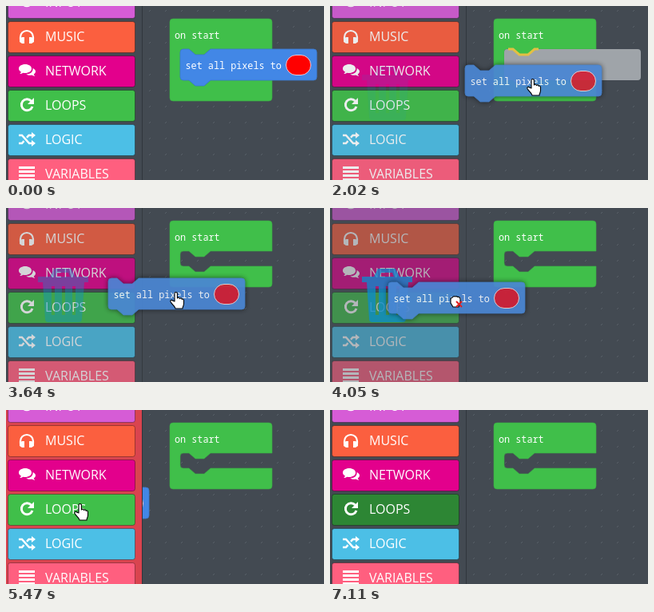
An HTML page that plays this animation: 398x218 px, repeating every 7510 ms.

```html
<!DOCTYPE html>
<html lang="en">
<head>
<meta charset="utf-8">
<title>Dragging a block to the toolbox</title>
<style>
html, body { margin: 0; height: 100%; overflow: hidden; background: #434a52; }
svg { display: block; width: 100vw; height: 100vh; }
text { fill: #fff; white-space: pre; }
.label { font: 16px "Open Sans", sans-serif; }
.code { font: 500 11.8px "Noto Sans Mono", monospace; }
.icon { fill: none; stroke: #fff; }
.dragged { opacity: .92; filter: drop-shadow(0 0 3px #0009); }
.dragged path { fill: #4a86d4; stroke: #4580cc; }
.dragged rect { fill: #d22038; stroke: #e6d5dc; }
.hand { fill: #fff; stroke: #000; stroke-width: 1.1; stroke-linejoin: round; }
</style>
</head>
<body>
<svg viewBox="0 0 398 218">
  <defs>
    <pattern id="dots" x="179" y="5" width="20" height="20" patternUnits="userSpaceOnUse">
      <path d="M0 2l2-2" stroke="#596169"/>
    </pattern>
  </defs>
  <rect width="398" height="218" fill="#434a52"/>
  <rect x="171" width="227" height="218" fill="url(#dots)"/>
  <path id="start" fill="#40bf4a" stroke="#39ac43" stroke-width=".6"/>
  <text class="code" x="211" y="41">on start</text>
  <g id="ghost" transform="translate(218 54)">
    <path class="shape" fill="#9fa4a9"/>
    <path d="M5 0h6l8 7h11l8-7h5" fill="none" stroke="#e3c043" stroke-width="3"/>
  </g>
  <g id="under"></g>
  <g id="toolbox">
    <rect id="back" width="170" height="218"/>
    <path d="M170.500 0V218" stroke="#30363c"/>
  </g>
  <path id="trash" fill="#0a8ccf" fill-rule="evenodd" d="M40 86H55l5-10H82l5 10H103v7H98l-3 46q0 4-4 4H53q-4 0-4-4L46 93H40zM62 86H80l-2-5H64zM57 98v36h4V98zM70 98v36h4V98zM83 98v36h4V98z"/>
  <g id="over">
    <g id="block">
      <path class="shape" fill="#4287e6" stroke="#3b79cf" stroke-width=".8"/>
      <text class="code" x="6.500" y="25">set all pixels to</text>
      <rect x="132.500" y="7.500" width="31" height="25" rx="12.500" fill="#f00" stroke="#e8c8d8"/>
    </g>
  </g>
  <g id="cursor">
    <path id="pointer" class="hand" d="M-3 1V-8.800a1.700 1.700 0 0 1 3.400 0V-3a1.600 1.600 0 0 1 3 .6a1.500 1.500 0 0 1 2.800.8a1.400 1.400 0 0 1 2.300 1V4c0 2.500-1.500 3.500-1.500 6H-2C-2 7.500-6.500 4.500-8 1.500c-.8-1.800 1.500-3 3-1.200z"/>
    <g id="fist" transform="translate(-2 -4)">
      <path class="hand" d="M-6-2q0-3 2.500-3 1-2 3-1 2-1 3 .5 3-.5 3.500 2.500V2L4 7H-3L-6 2z"/>
      <path d="M1 0l7 7M8 0l-7 7" stroke="#e02020" stroke-width="2"/>
    </g>
  </g>
</svg>
<script>
const $ = id => document.getElementById(id);
const LOOP = 7510, GRAB = 1420, UNSNAP = 3450, DELETING = 4650, DROP = 5470, GONE = 5670, CALM = 5870, HOVER = 6290;

// Name, colour, stroked icon part, stroke width, filled icon part
const items = [
  ["INPUT", "#d65cd6", "M3 8a7 7 0 1 0 14 0M10 8v3", 2.4, ""],
  ["MUSIC", "#fb5f3f", "M2 14V11a8 8 0 0 1 16 0V14", 2.2, "M4 11h3v8h-3l-3-2v-4zM13 11h3l3 2v4l-3 2h-3z"],
  ["NETWORK", "#e3008c", "", 0, "M8 2c4.500 0 8 2.300 8 5.500S12.500 13 8 13c-1 0-1.800-.1-2.600-.3C4.200 13.500 2.900 14 1.200 14.100c1-.9 1.600-1.800 1.700-2.600C1 10.500 0 9.100 0 7.500 0 4.300 3.500 2 8 2zM17.500 7c2 1 3.500 2.200 3.500 4 0 1.500-.9 2.700-2.300 3.600.2.800.8 1.500 1.600 2.300-1.600-.1-3-.6-4-1.300-3 .5-5.500 0-7-1.100 5 0 9-3 8.200-7.500z"],
  ["LOOPS", "#40bf4a", "M15.500 5A7 7 0 1 0 17 12", 2.9, "M19 1v8h-8z"],
  ["LOGIC", "#4cbfe6", "M0 5h4l9 10h4M0 15h4l2.500-2.800M10 7.800L12.500 5H17", 2.5, "M16 1l5 4-5 4zM16 11l5 4-5 4z"],
  ["VARIABLES", "#ff5f7f", "M0 2.500h20M0 7.500h20M0 12.500h20M0 17.500h20", 3, ""]
];
$("toolbox").insertAdjacentHTML("beforeend", items.map(([name, color, line, width, solid], i) => `
  <g transform="translate(0 ${i * 43 - 24})">
    <rect id="${name}" x="2.500" y=".5" width="159" height="39" rx="3" fill="${color}" stroke="#0005"/>
    <g transform="translate(16 9)">
      <path class="icon" d="${line}" stroke-width="${width}"/><path d="${solid}" fill="#fff"/>
    </g>
    <text class="label" x="49" y="25">${name}</text>
  </g>`).join(""));

for (const path of document.querySelectorAll(".shape"))
  path.setAttribute("d", "M4 0H11l8 7h11l8-7H167q4 0 4 4v31q0 4-4 4H38l-8 7h-11l-8-7H4q-4 0-4-4V4q0-4 4-4z");

const startPath = slot => `M209 16H329q4 0 4 4V54H256l-8 7h-11l-8-7H222q-4 0-4 4v${slot - 8}q0 4 4 4H229l8 7h11l8-7H333v22q0 4-4 4H209q-4 0-4-4V20q0-4 4-4z`;

// Time, pointer x and y, extra pointer shift while the block rests
const steps = [
  [0, -99, -99], [200, 372, 210], [400, 356, 180], [600, 338, 142], [800, 320, 108], [1000, 308, 88], [1200, 304, 83],
  [GRAB, 295, 86], [1620, 284, 90], [1820, 270, 96], [2020, 255, 102], [2220, 238, 109],
  [2430, 222, 116], [2630, 222, 116, 7], [2830, 222, 116, -9],
  [UNSNAP, 219, 116], [3640, 214, 116], [3840, 188, 119], [4050, 159, 121], [4250, 146, 122], [4450, 136, 123],
  [DELETING, 115, 125], [4870, 94, 128], [DROP, 94, 128],
  [HOVER, 96, 130], [6490, 170, 150], [6700, 270, 185], [6900, 378, 208], [7110, -99, -99]
];

const clamp = v => Math.max(0, Math.min(1, v));
const move = (id, x, y) => $(id).setAttribute("transform", `translate(${x} ${y})`);
const show = (id, on) => $(id).style.display = on ? "" : "none";

function draw(t) {
  const [, x, y, shift = 0] = steps.findLast(s => s[0] <= t);
  const held = t >= GRAB && t < DROP;
  const deleting = t >= 3840 && t < DROP;

  $("start").setAttribute("d", startPath(t < UNSNAP ? 39 : 19));
  show("ghost", t >= GRAB && t < UNSNAP);

  $("toolbox").style.opacity = held ? clamp(.6 + (x - 159) / 320) : 1;
  $("back").setAttribute("fill", t >= DELETING && t < CALM ? "#d9444f" : "#434a52");
  $("LOOPS").setAttribute("fill", t >= HOVER ? "#2d8634" : "#40bf4a");
  $("trash").style.opacity = held ? clamp(.75 - (x - 159) * .0068) : 0;

  const layer = $(t < DROP ? "over" : "under");
  if ($("block").parentNode !== layer) layer.append($("block"));
  $("block").setAttribute("class", held ? "dragged" : "");
  show("block", t < GONE);
  if (t < GRAB) move("block", 218, 54);
  else move("block", x - 86, Math.min(y - 28, 97));

  move("cursor", x + shift, y);
  show("pointer", !deleting);
  show("fist", deleting);
}

const begin = performance.now();
(function tick() {
  draw((performance.now() - begin) % LOOP);
  requestAnimationFrame(tick);
})();
</script>
</body>
</html>
```
